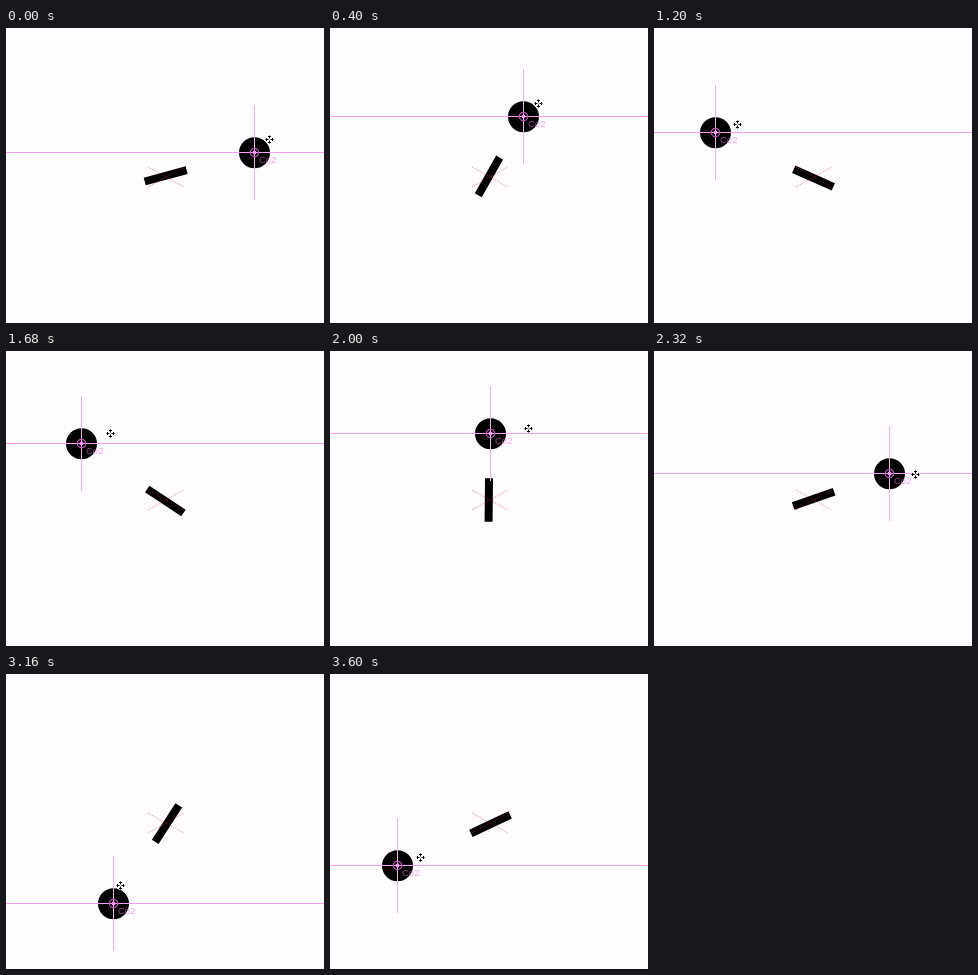
These frames come from a looping animation (318x295 px, 3.68 s). An HTML page with a canvas:

```html
<!DOCTYPE html>
<html>
<head>
<meta charset="utf-8">
<style>
  html, body { margin: 0; width: 318px; height: 295px; overflow: hidden; background: #fefcff; }
  canvas { display: block; }
</style>
</head>
<body>
<canvas width="318" height="295"></canvas>
<script>
const ctx = document.querySelector('canvas').getContext('2d');
const LOOP = 3680, STEP = 40, LAG = 55;
const PIVOT = { x: 160, y: 149 };

// Turning points of the dragged disc, t in ms
const path = [
  { t: 0, x: 249, y: 125 },
  { t: 560, x: 170, y: 76 },
  { t: 760, x: 129, y: 67.5 },
  { t: 1120, x: 80, y: 90 },
  { t: 1200, x: 61.5, y: 105 },
  { t: 1680, x: 75.5, y: 93 },
  { t: 1960, x: 150, y: 81 },
  { t: 2320, x: 236, y: 122.5 },
  { t: 2800, x: 202, y: 238 },
  { t: 3000, x: 154, y: 250 },
  { t: 3360, x: 60, y: 200 },
  { t: 3600, x: 68, y: 192 }
];
const last = path.length - 1;

function slope(i, axis) {
  const a = path[Math.max(i - 1, 0)], b = path[Math.min(i + 1, last)];
  return (b[axis] - a[axis]) / (b.t - a.t);
}

// Smooth spline through the turning points, at rest after the last one
function position(t) {
  if (t >= path[last].t) return path[last];
  const i = path.findIndex(p => p.t > t) - 1;
  const a = path[i], b = path[i + 1];
  const span = b.t - a.t, s = (t - a.t) / span, r = 1 - s;
  const mix = axis =>
    r * r * (1 + 2 * s) * a[axis] + s * s * (3 - 2 * s) * b[axis] +
    s * r * span * (r * slope(i, axis) - s * slope(i + 1, axis));
  return { x: mix('x'), y: mix('y') };
}

function line(x1, y1, x2, y2, color, width = 1) {
  ctx.strokeStyle = color;
  ctx.lineWidth = width;
  ctx.beginPath();
  ctx.moveTo(x1, y1);
  ctx.lineTo(x2, y2);
  ctx.stroke();
}

function disc(x, y, r, color) {
  ctx.fillStyle = color;
  ctx.beginPath();
  ctx.arc(x, y, r, 0, 7);
  ctx.fill();
}

function drawBar(angle) {
  ctx.save();
  ctx.translate(PIVOT.x, PIVOT.y);
  ctx.save();
  ctx.rotate(angle);
  ctx.fillStyle = '#000';
  ctx.fillRect(-21.7, -5.2, 43.4, 8);
  ctx.restore();
  ctx.setLineDash([1.2, 1.2]);
  for (const side of [-1, 1]) line(-18, -10 * side, 18, 10 * side, 'rgba(210,35,50,.52)');
  ctx.restore();
}

function drawTarget(x, y) {
  disc(x, y + .3, 15.5, '#000');
  line(0, y, 318, y, '#f5a0f3');
  line(x, y - 47.5, x, y + 47.5, '#efb2e4');
  ctx.strokeStyle = '#bd55b8';
  ctx.lineWidth = 1.2;
  ctx.beginPath();
  ctx.arc(x, y, 4.2, 0, 7);
  ctx.stroke();
  disc(x, y, 2, '#f49af0');
  ctx.font = '9.5px "Liberation Sans", Arial, sans-serif';
  ctx.fillStyle = 'rgba(236,110,220,.62)';
  ctx.fillText('Co2', x + 4.5, y + 10.5);
}

function drawCursor(x, y) {
  ctx.save();
  ctx.translate(x, y);
  for (const [color, width] of [['#fff', 2], ['#000', 1]]) {
    for (let arm = 0; arm < 4; arm++) {
      line(0, -1, 0, -4, color, width);
      line(-1.5, -3, 1.5, -3, color, width);
      ctx.rotate(Math.PI / 2);
    }
  }
  ctx.restore();
}

function frame(now) {
  const t = Math.floor(now % LOOP / STEP) * STEP;
  const p = position(t), next = position(t + 1);
  ctx.fillStyle = '#fefcff';
  ctx.fillRect(0, 0, 318, 295);
  drawBar(Math.atan2(p.y - PIVOT.y, p.x - PIVOT.x));
  drawTarget(Math.round(p.x) - .5, Math.round(p.y) - .5);
  // The disc trails the pointer
  drawCursor(Math.round(p.x + 22 + (next.x - p.x) * LAG) + .5,
             Math.round(p.y - 9.5 + (next.y - p.y) * LAG) + .5);
  requestAnimationFrame(frame);
}
requestAnimationFrame(frame);
</script>
</body>
</html>
```
